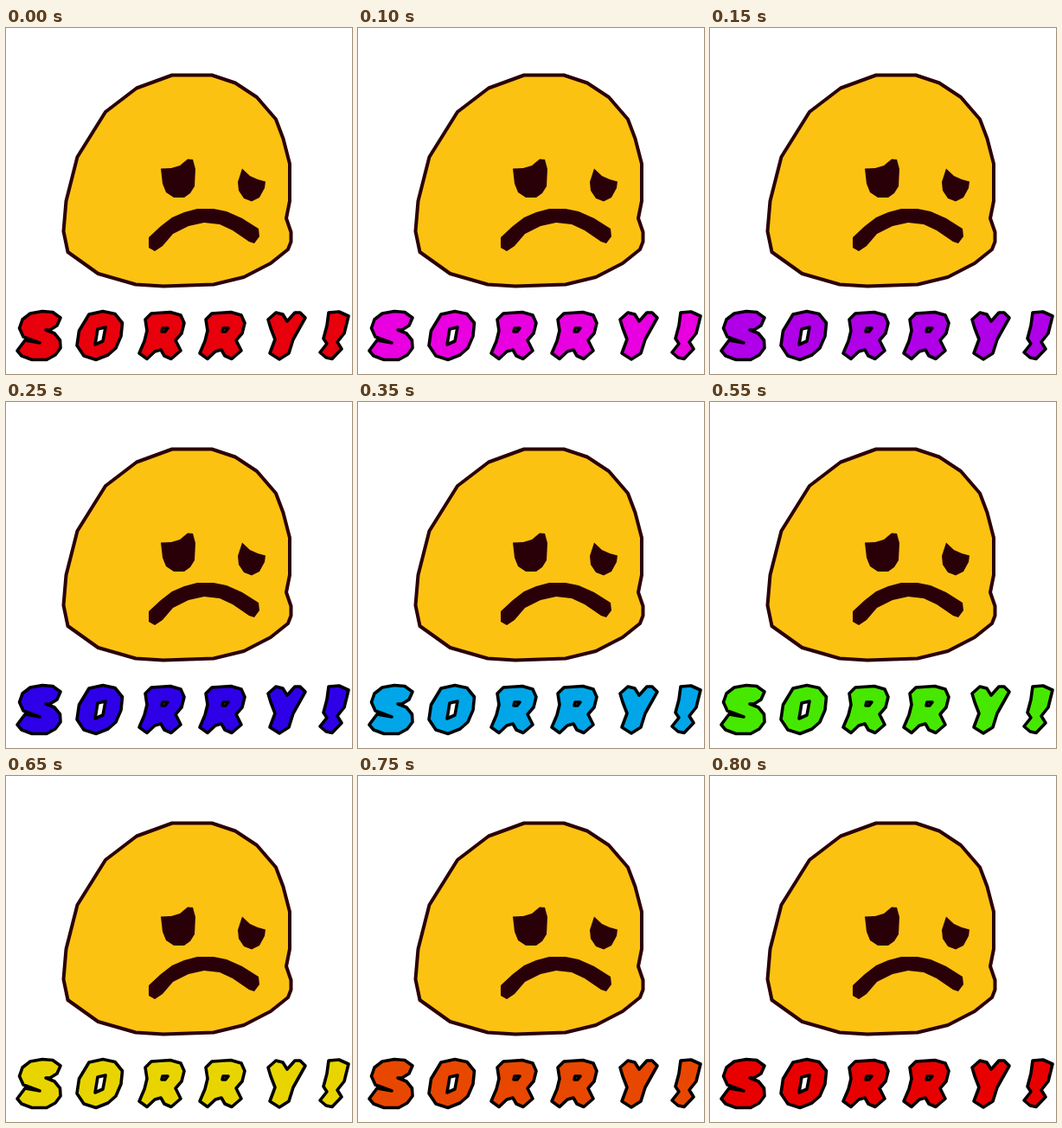
Recreate the animation shown at these times as an HTML page. Size 400x400 px, loop 0.85 s.

```html
<!DOCTYPE html>
<html lang="en">
<head>
<meta charset="utf-8">
<title>Sorry!</title>
<style>
  html, body { margin: 0; width: 100%; height: 100%; overflow: hidden; background: #fff; }
  svg { display: block; width: 400px; height: 400px; }
  #face { fill: #fcc212; stroke: #2a0008; stroke-width: 4; stroke-linejoin: round; }
  #features { fill: #2a0008; }
  #word { stroke: #000; stroke-width: 3.6; stroke-linejoin: round; fill-rule: evenodd; }
</style>
</head>
<body>
<svg viewBox="0 0 400 400">
  <path id="face" d="M66.500 235 69.500 200 82.500 149 115 97 151 69.500 192 54.500H238L265 63.500 290 80 312 105.500 320.500 128 328 157V200L324 220 329.500 236V247L326 256 306 272 275 288 240 296.500 182 298.500 150 296.500 106.500 284 71.500 259Z"/>
  <g id="features">
    <path d="M179 162.500 191 162 201 159 210 151.500 216 152 219 163 218 183 213 191 206 196H194L185 190 181 180Z"/>
    <path d="M273 162.500 282 171 291 175 300 177.500 299 185 293 196 284 200.500 275 197 269 188 268 178Z"/>
    <path d="M165 242 179 229 192 219 206 213 221 209H240L255 212 273 220 292 232 293 241 287 249 281 247 262 234 247 227 229 225 211 229 193 238 181 252 172 258 165 254Z"/>
  </g>
  <g id="word" role="img" aria-label="SORRY!">
    <path d="M19 337 28 330 42 327.500 54 328.500 63 335 59 344 51 349 46 349 56 353 62.500 361 63 370 57 378 47 383.500H30L18 379 13 373 22 361 39 364 20 357 15.500 347Z"/>
    <path d="M96 331 112 327.500 126 330.500 134.500 341 133 356 127 370 118 378 104 383.500 90 379 82 367 84.500 350ZM106 348 115 346 112 362 103 366Z"/>
    <path id="r" d="M161 337 168 330 190 328.500 202 332 206 341 203 353 196 361 202 373 191 382.500 183 379 179 372 172 374 163 382.500 154 376 160 362 163 350ZM181 347 187 347 184 351 180 351Z"/>
    <use href="#r" x="70"/>
    <path d="M303 337 312 329 320 331 325 339 334 329 340 329 346 335 332 360 327 376 316 383 305 376 311 360 306 347Z"/>
    <path d="M373 329 385 328 396 333 391 353 383 363 388 371 377 382.500 370 381 363 375 371 365 367 359 371 344Z"/>
  </g>
</svg>
<script>
  const LOOP = 850, STEP = 50;
  // [time in ms, hue in degrees]
  const hues = [[0, 357], [100, 302], [250, 252], [350, 197], [450, 149], [650, 55], [800, 0]];
  const word = document.getElementById('word');

  function hueAt(time) {
    const i = Math.max(1, hues.findIndex(([t]) => t >= time));
    const [t0, h0] = hues[i - 1], [t1, h1] = hues[i];
    return h0 + (h1 - h0) * (time - t0) / (t1 - t0);
  }

  function draw() {
    const time = Math.floor(performance.now() % LOOP / STEP) * STEP;
    word.setAttribute('fill', `hsl(${hueAt(time)} 100% 45.5%)`);
    requestAnimationFrame(draw);
  }
  draw();
</script>
</body>
</html>
```
